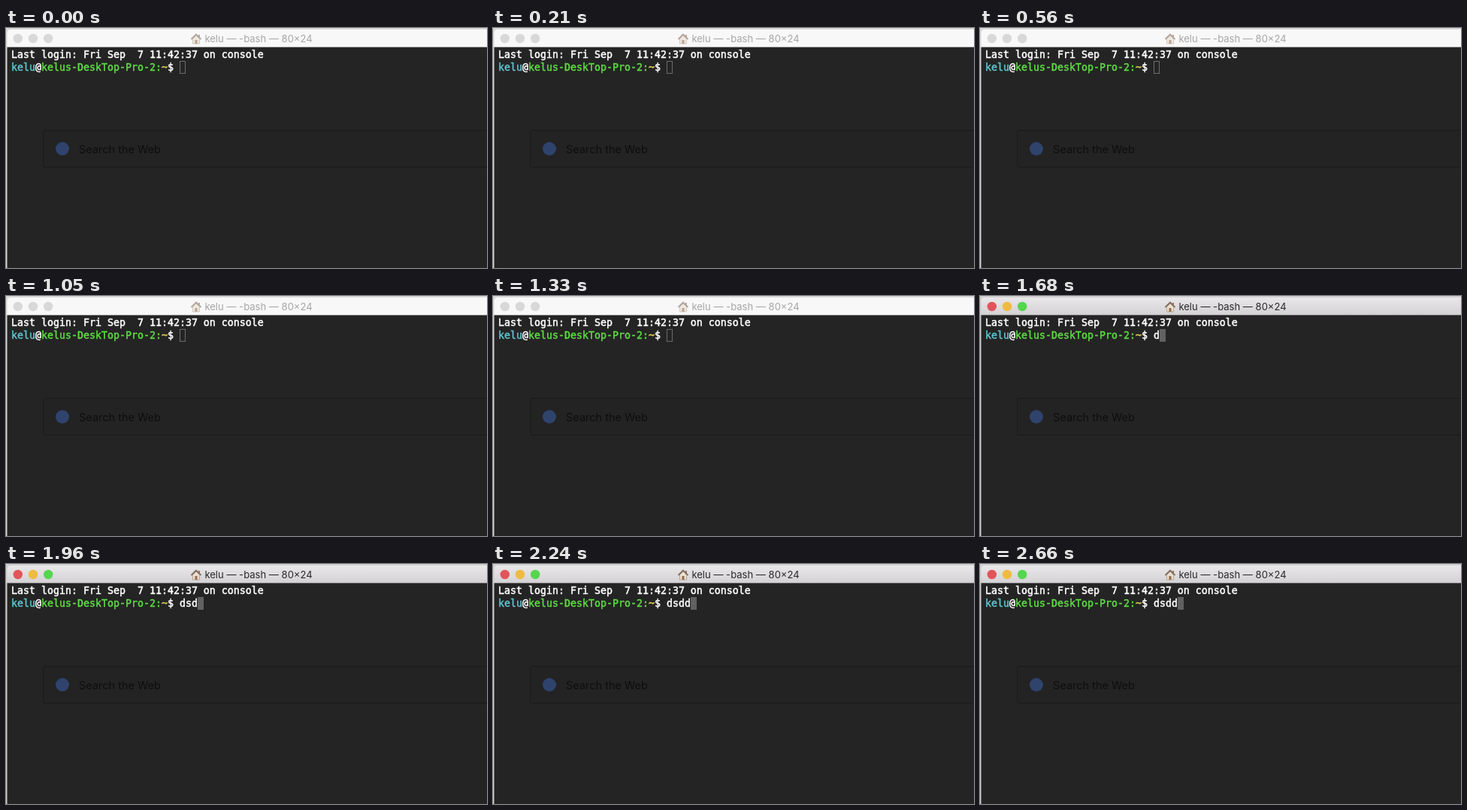
An HTML page for the animation above (2870 ms loop, 640 px wide and 320 px high).

```html
<!DOCTYPE html>
<html lang="en">
<head>
<meta charset="utf-8">
<title>Terminal</title>
<style>
  html, body { margin: 0; width: 100%; height: 100%; overflow: hidden; background: #242424; }
  svg { display: block; }
  text { white-space: pre; }
  .ui { font-family: Inter, "Open Sans", sans-serif; }
  .mono { font: 13.29px "DejaVu Sans Mono", monospace; fill: #fff; stroke: #fff; stroke-width: .5px; }
  .user { fill: #5fc3cf; stroke: #5fc3cf; }
  .host { fill: #5ddb42; stroke: #5ddb42; }
  .path { fill: #d9cd55; stroke: #d9cd55; }

  .desk { fill: #d8d8d8; }
  .bar { fill: #f8f8f8; }
  .edge { fill: #8e8e8e; }
  .title { font-size: 13.05px; fill: #a6a6a6; }
  .house { opacity: .6; }
  .dots circle { fill: #d8d8d8; }
  .cursor { fill: none; stroke: #6c6c6c; }

  .active .desk { fill: #d0d0d0; }
  .active .bar { fill: url(#barFill); }
  .active .edge { fill: #6b6b6b; }
  .active .title { fill: #2a2a2a; }
  .active .house { opacity: 1; }
  .active .dots .close { fill: #e1555a; }
  .active .dots .min { fill: #efbb40; }
  .active .dots .zoom { fill: #55d64e; }
  .active .cursor { fill: #616161; stroke: #616161; }
</style>
</head>
<body>
<svg id="stage" width="640" height="320" viewBox="0 0 640 320">
  <defs>
    <linearGradient id="barFill" x2="0" y2="1">
      <stop stop-color="#e9e7e9"/>
      <stop offset="1" stop-color="#d3d1d3"/>
    </linearGradient>
  </defs>

  <rect class="desk" width="640" height="320"/>
  <path class="bar" d="M1.5 26V7Q1.5 2 6.5 2H640V26Z"/>
  <rect class="edge" x="1.5" y="25" width="639" height="1"/>
  <rect x="1.5" y="26" width="639" height="294" fill="#242424"/>

  <g class="dots">
    <circle class="close" cx="15.8" cy="14" r="6.2"/>
    <circle class="min" cx="36" cy="14" r="6.2"/>
    <circle class="zoom" cx="56.2" cy="14" r="6.2"/>
  </g>
  <g class="house">
    <path d="M248.5 14.5L253 10L257.5 14.5V21H248.5Z" fill="#e9dfcd" stroke="#a39583" stroke-width=".7"/>
    <path d="M256 9h2v4h-2z" fill="#a8705c"/>
    <path d="M246.5 15L253 8.6L259.5 15" fill="none" stroke="#806d62" stroke-width="1.8"/>
    <path d="M251.5 16h3v5h-3z" fill="#96694d"/>
  </g>
  <text class="ui title" x="264.4" y="19">kelu — -bash — 80×24</text>

  <rect x="49.5" y="136.5" width="600" height="49" rx="3" fill="#232323" stroke="#1a1a1a"/>
  <circle cx="75" cy="161" r="9" fill="#2f436d"/>
  <text class="ui" x="97" y="166.5" font-size="14.5" fill="#0e0e0e">Search the Web</text>

  <text class="mono" x="7" y="40">Last login: Fri Sep  7 11:42:37 on console</text>
  <text class="mono" x="7" y="57"><tspan class="user">kelu</tspan>@<tspan class="host">kelus-DeskTop-Pro-2:</tspan><tspan class="path">~</tspan>$ <tspan id="typed"></tspan></text>
  <rect class="cursor" id="cursor" x="231.5" y="44.5" width="7" height="16"/>
</svg>
<script>
  const LOOP = 2870, FOCUS = 1400, CHAR = 8, COMMAND_X = 231;
  const keys = [[1540, "d"], [1820, "s"], [1960, "d"], [2100, "d"]];
  const [stage, typed, cursor] =
    ["stage", "typed", "cursor"].map(id => document.getElementById(id));
  const start = performance.now();

  function draw(now) {
    const t = Math.max(0, now - start) % LOOP;
    const command = keys.filter(([at]) => t >= at).map(([, key]) => key).join("");
    stage.classList.toggle("active", t >= FOCUS);
    if (typed.textContent !== command) typed.textContent = command;
    cursor.setAttribute("x", COMMAND_X + command.length * CHAR + 0.5);
    requestAnimationFrame(draw);
  }
  draw(start);
</script>
</body>
</html>
```
